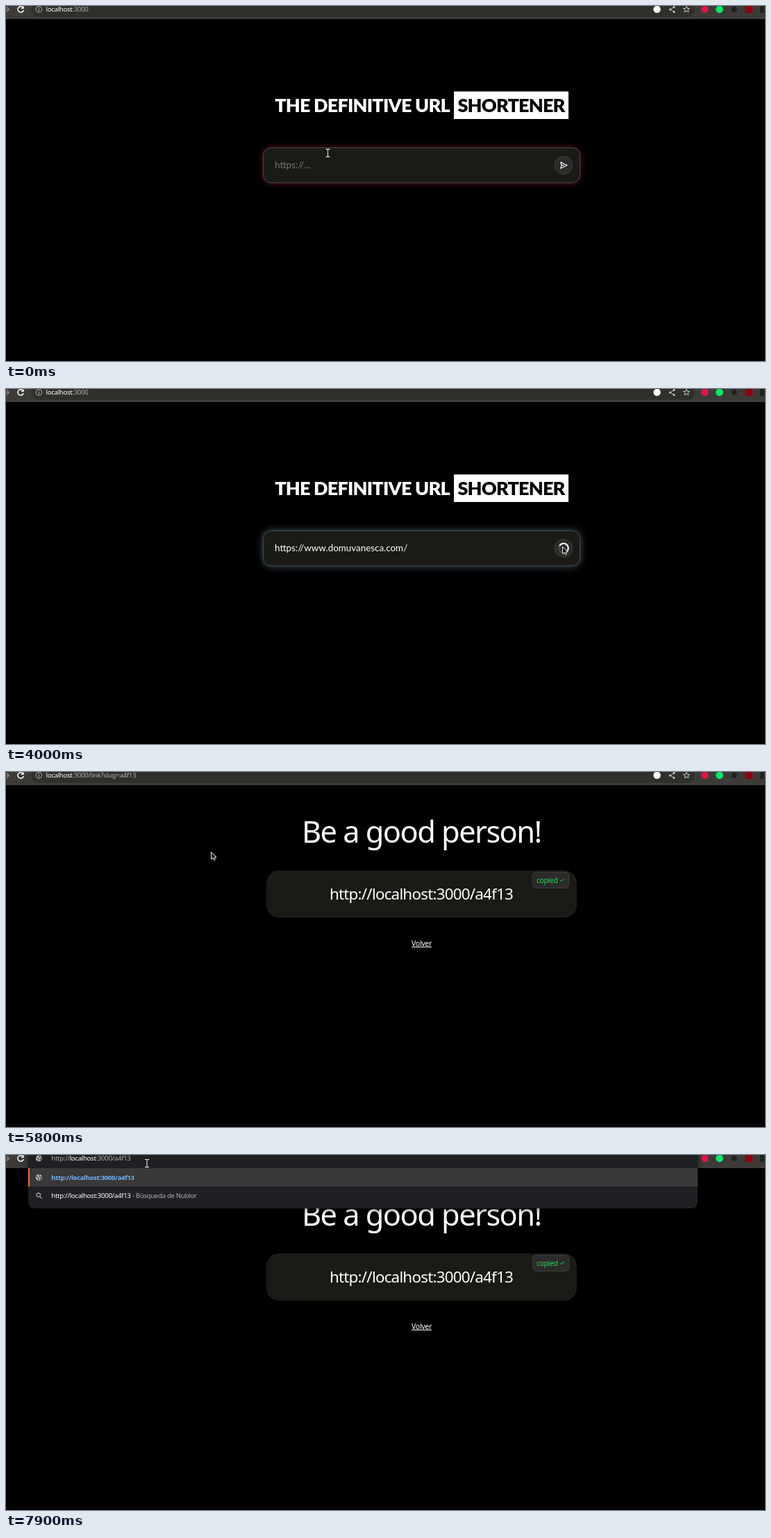
Write an HTML page that moves like this. It is 1093 px wide and 512 px high and loops after 8000 ms.

```html
<!DOCTYPE html>
<html lang="en">
<head>
<meta charset="utf-8">
<title>URL shortener</title>
<style>
  html, body { margin: 0; width: 100%; height: 100%; overflow: hidden; background: #000; }
  svg { display: block; width: 1093px; height: 512px; }
  text { fill: #fff; white-space: pre; }
  .ui { font-family: "Noto Sans", "Open Sans", sans-serif; letter-spacing: -.035em; }
  .bar { font-size: 9.7px; }
  .field { font: 13.4px Lato, "Open Sans", sans-serif; }
  .title { font: 900 27px Lato, "Open Sans", sans-serif; letter-spacing: -.03em; }
  .mid { text-anchor: middle; }
  .dim { fill: #adadaa; }
  .line { fill: none; stroke: #ddd; stroke-width: 1.2; }
  .btn { fill: #2b2b29; stroke: #454543; stroke-width: .8; }
</style>
</head>
<body>
<svg viewBox="0 0 1093 512" xmlns="http://www.w3.org/2000/svg">
  <defs>
    <g id="globe">
      <circle r="4.4" fill="#c4c7c5"/>
      <path d="M-3.4-1.5L-.5 1.2L-1 3.6M.2-3.8L.6-1.6L3.6-.6M1.5 3L2 1L3.8 1" fill="none" stroke="#303134" stroke-width="1.2"/>
    </g>
    <path id="ibeam" d="M-2.5-5.5H-1L0-5L1-5.5H2.5M0-5V5M-2.5 5.5H-1L0 5L1 5.5H2.5"/>
  </defs>
  <rect width="1093" height="512"/>

  <g id="home">
    <text class="title mid" x="513" y="153">THE DEFINITIVE URL</text>
    <rect x="645" y="123.3" width="165" height="39.7" fill="#fff"/>
    <text class="title mid" x="727.5" y="153" style="fill:#000">SHORTENER</text>
    <rect id="box" x="370.5" y="204.5" width="456" height="50.5" rx="11" fill="#1a1a17" stroke="#4a4848"/>
    <text id="hint" class="field" x="387" y="234.3" style="fill:#777774">https://...</text>
    <text id="typed" class="field" x="387" y="234.3">https://www.domuvanesca.com/</text>
    <path id="spell" d="M387 236.8H418M430 236.8H576" stroke="#c81e3c" stroke-width="1.2"/>
    <rect id="caret" y="222" width="1" height="15" fill="#fff"/>
    <circle class="btn" cx="803" cy="229.7" r="13"/>
    <path id="send" class="line" d="M798.8 225.2L808 229.7L798.8 234.2L800 229.7ZM800 229.7H803.5" style="stroke:#fff" stroke-linejoin="round"/>
    <g id="spinner">
      <circle r="6.8" fill="none" stroke="#4a4a48" stroke-width="2"/>
      <path d="M-5.89-3.4A6.8 6.8 0 1 1 5.2 4.4" fill="none" stroke="#eee" stroke-width="2.2"/>
    </g>
  </g>

  <g id="result">
    <text class="ui mid" x="598.3" y="102" font-size="43.3">Be a good person!</text>
    <rect x="375" y="142" width="447" height="68" rx="18" fill="#1a1a17"/>
    <text class="ui mid" x="598" y="183.5" font-size="22.4">http://localhost:3000/a4f13</text>
    <g id="copy">
      <rect class="btn" x="787.4" y="144.4" width="23.4" height="25.4" rx="5"/>
      <path class="line" d="M797.3 152H803.8V158.3H797.3ZM797.3 154.7H794.4V161H801V158.3"/>
    </g>
    <g id="copied">
      <rect class="btn" x="758.4" y="144.4" width="52.4" height="23" rx="5"/>
      <text class="ui" x="764" y="159.8" font-size="10.4" style="fill:#2ed15a">copied</text>
      <path class="line" d="M798.2 156L800 157.7L803.6 153.8" style="stroke:#2ed15a;stroke-width:1"/>
    </g>
    <text class="ui mid" x="598.5" y="250.8" font-size="10.6" text-decoration="underline">Volver</text>
  </g>

  <g id="toolbar">
    <rect width="1093" height="18.5" fill="#3c3b37"/>
    <rect y="17.5" width="1093" height="1" fill="#4a4a46"/>
    <path class="line" d="M-3 5H4M1 1.5L4.4 5L1 8.5" style="stroke:#8a8a86"/>
    <path class="line" d="M24.2 2A4.2 4.2 0 1 0 25.2 6" style="stroke:#fff;stroke-width:1.5"/>
    <path d="M25.7-.3V4H21.4Z" fill="#fff"/>
    <rect id="pill" x="36" y="-6" width="956" height="21.8" rx="10.9"/>
    <circle class="line" cx="47.3" cy="4.8" r="4.3" style="stroke:#bbb;stroke-width:1"/>
    <path d="M47.3 4.2V7.3M47.3 2.2V3.3" stroke="#bbb" stroke-width="1.1"/>
    <rect id="picked" x="58" y="-1" width="131" height="12" fill="#d9562c"/>
    <text class="ui bar" x="57.6" y="8.2">localhost<tspan class="dim">:3000</tspan><tspan class="dim" id="path">/link?slug=a4f13</tspan></text>
    <rect id="barCaret" x="188.2" y="-1" width="1" height="11.5" fill="#fff"/>
    <circle cx="937.5" cy="4.8" r="5.2" fill="#fff"/>
    <path class="line" d="M962 1.6L956.5 5L962 8.4" style="stroke:#c4c4c0;stroke-width:1"/>
    <g fill="#c4c4c0"><circle cx="962" cy="1.4" r="1.5"/><circle cx="956.3" cy="5" r="1.5"/><circle cx="962" cy="8.5" r="1.5"/></g>
    <path id="star" class="line" style="stroke:#c4c4c0;stroke-width:1"/>
    <circle cx="1006.5" cy="4.7" r="5.2" fill="#dc1748"/>
    <circle cx="1027.5" cy="4.8" r="5.4" fill="#0be56c"/>
    <circle cx="1048.5" cy="4.8" r="4" fill="#20201e"/>
    <rect x="1064.5" y="-1" width="10.5" height="11" fill="#8c0410"/>
    <rect x="1086" y="0" width="6" height="10" fill="#20201e"/>
  </g>

  <g id="menu">
    <path d="M32-6H996V67Q996 77 986 77H42Q32 77 32 67Z" fill="#1f2023" style="filter:drop-shadow(0 2px 4px #0008)"/>
    <rect x="32" y="19" width="964" height="26.5" fill="#383938"/>
    <rect x="32" y="19" width="2" height="26.5" fill="#f0703c"/>
    <use href="#globe" x="47.3" y="4.8"/>
    <use href="#globe" x="47.3" y="32.3"/>
    <path class="line" d="M49 60.2L51.6 62.8M49.5 57.6A2.8 2.8 0 1 1 43.9 57.6A2.8 2.8 0 1 1 49.5 57.6" style="stroke:#b4b6b8"/>
    <text class="ui bar" x="65.3" y="8.2"><tspan class="dim">http://</tspan>localhost<tspan class="dim">:3000/a4f13</tspan></text>
    <rect id="menuCaret" x="181" y="-1" width="1" height="11.5" fill="#fff"/>
    <text class="ui" x="65.3" y="35.7" font-size="9.5" font-weight="700" style="fill:#74aef5">http://localhost:3000/a4f13</text>
    <text class="ui bar" x="65.3" y="62">http://localhost:3000/a4f13<tspan class="dim"> - Búsqueda de Nublor</tspan></text>
  </g>

  <g id="beam" fill="none" stroke-linecap="square">
    <use href="#ibeam" stroke="#000" stroke-width="2.8"/>
    <use href="#ibeam" stroke="#e4e4e4" stroke-width="1.3"/>
  </g>
  <path id="arrow" d="M.5.5V10.8L2.9 8.6L4.5 12L6.3 11.2L4.8 8H8Z" fill="#111" stroke="#eee" stroke-width="1" stroke-linejoin="round"/>
  <path id="hand" d="M-1 0Q0-1 1 0V4L5 5Q6 5.5 6 7L5 12H-1L-4.5 7.5Q-4 6 -3 6.6L-1 8Z" fill="#111" stroke="#eee" stroke-width="1" stroke-linejoin="round"/>
</svg>
<script>
const LOOP = 8000, STEP = 100;
const $ = id => document.getElementById(id);

// time, pointer kind, x, y
const pointer = [
  [0, 'beam', 463.5, 212], [400, 'beam', 463.5, 208], [500, 'beam', 463.5, 205],
  [700, 'beam', 465, 218], [800, 'beam', 467.5, 230],
  [2100, 'beam', 600, 250], [2200, 'arrow', 763, 270], [2400, 'beam', 806, 254],
  [2500, 'beam', 805, 241], [2600, 'arrow', 802, 226], [2800, 'arrow', 801, 225],
  [3700, 'arrow', 801, 227], [4600, 'arrow', 790, 223], [4700, 'arrow', 745, 206],
  [4800, 'arrow', 690, 190], [4900, 'hand', 645, 179], [5000, 'hand', 627, 175],
  [5400, 'hand', 600, 170], [5500, 'hand', 520, 155], [5600, 'arrow', 430, 138],
  [5700, 'arrow', 350, 124], [5800, 'arrow', 295, 115], [5900, 'arrow', 268, 103],
  [6000, 'arrow', 240, 84], [6100, 'arrow', 215, 58], [6200, 'arrow', 197, 31],
  [6300, 'arrow', 199, 20], [6400, 'beam', 202, 14], [6500, 'beam', 203, 12]
];
// time, red, green, blue, blur
const glow = [[0, 98, 16, 34, 4], [2400, 20, 54, 94, 4], [4100, 64, 84, 100, 5.5]];

const within = (t, a, b) => t >= a && t < b;
const show = (id, on) => { $(id).style.display = on ? '' : 'none'; };
const place = (id, x, y, turn = 0) =>
  $(id).setAttribute('transform', `translate(${x} ${y}) rotate(${turn})`);

function glowAt(t) {
  const i = t < glow[1][0] ? 0 : 1, a = glow[i], b = glow[i + 1];
  const k = (t - a[0]) / (b[0] - a[0]);
  const [, red, green, blue, blur] = a.map((v, n) => v + (b[n] - v) * k);
  return `drop-shadow(0 0 ${blur}px rgb(${red},${green},${blue}))`;
}

function drawHome(t) {
  const pasted = t >= 1600, busy = t >= 3700;
  $('box').style.filter = glowAt(t);
  show('hint', !pasted);
  show('typed', pasted);
  show('spell', pasted && !busy);
  show('caret', within(t, 1100, 2100) || within(t, 2800, 3400));
  $('caret').setAttribute('x', pasted ? 579 : 386);
  show('send', !busy);
  show('spinner', busy);
  place('spinner', 803, 229.5, (t - 4000) * .36);
}

function drawBar(t) {
  const focus = t >= 6800, pill = $('pill');
  pill.setAttribute('fill', focus ? '#202124' : t >= 6400 ? '#3f3f3c' : '#2f2f2c');
  pill.setAttribute('stroke', focus ? '#ea6a40' : 'none');
  pill.setAttribute('stroke-width', 1.6);
  show('path', t >= 4100);
  show('barCaret', within(t, 6800, 6900));
  show('picked', within(t, 6900, 7400));
  show('menu', t >= 7400);
  show('menuCaret', t < 7900);
}

function draw(t) {
  const home = t < 4100;
  show('home', home);
  show('result', !home);
  if (home) drawHome(t);
  show('copy', t < 5200);
  show('copied', t >= 5200);
  drawBar(t);
  const [, kind, x, y] = pointer.filter(p => p[0] <= t).pop();
  for (const id of ['beam', 'arrow', 'hand']) show(id, id === kind);
  place(kind, x, y);
}

const star = Array.from({ length: 10 }, (_, i) => {
  const r = i % 2 ? 2 : 4.8, a = i * Math.PI / 5 - Math.PI / 2;
  return `${980 + r * Math.cos(a)} ${5 + r * Math.sin(a)}`;
});
$('star').setAttribute('d', `M${star.join('L')}Z`);

const start = performance.now();
function tick(now) {
  const t = Math.max(0, now - start) % LOOP;
  draw(Math.floor(t / STEP) * STEP);
  requestAnimationFrame(tick);
}
draw(0);
requestAnimationFrame(tick);
</script>
</body>
</html>
```
